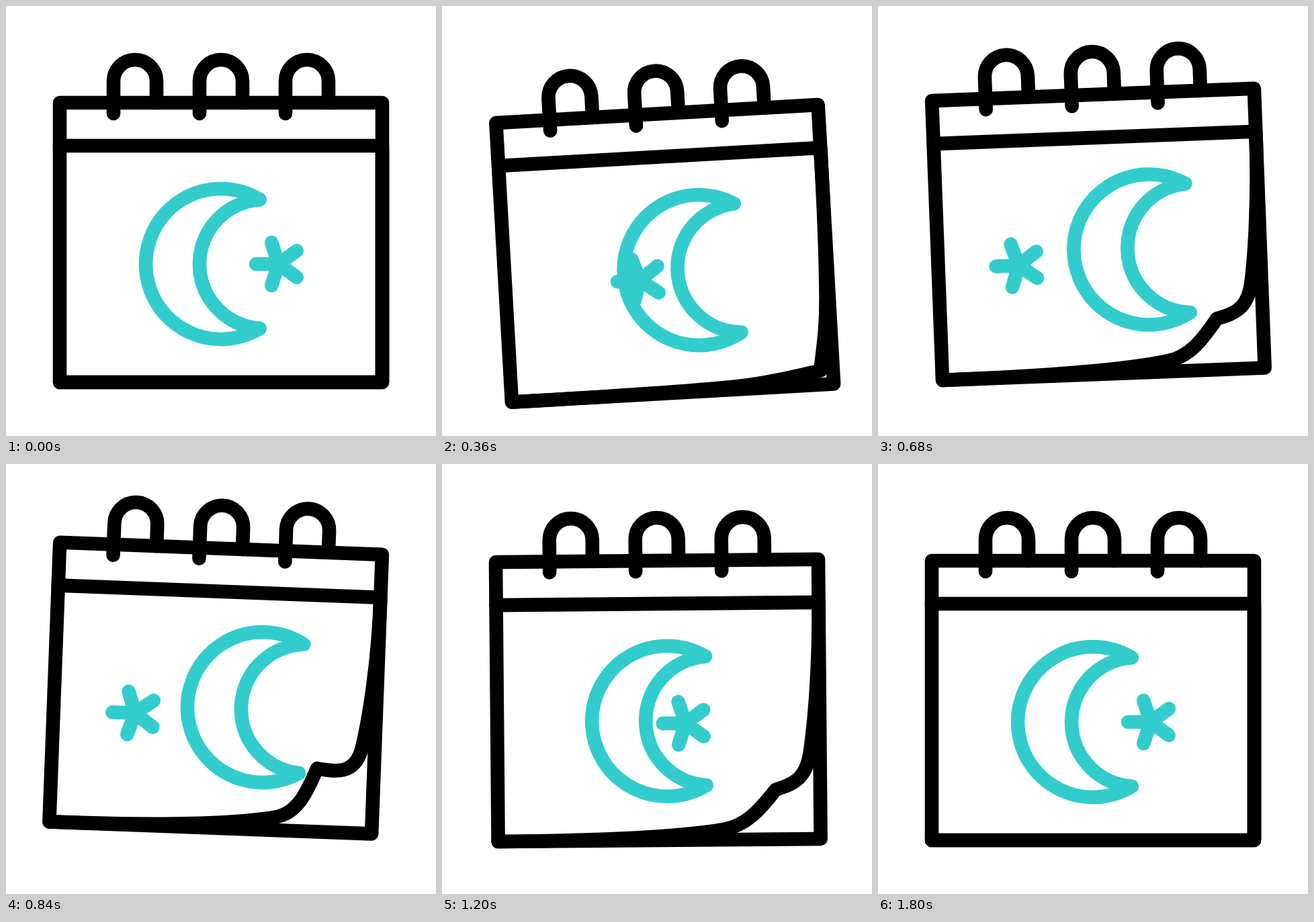
Write an HTML page with a canvas that moves like this. It is 640x640 px and loops after 2 s.

```html
<!DOCTYPE html>
<html lang="en">
<head>
<meta charset="utf-8">
<title>Calendar</title>
<style>
  html, body { margin: 0; width: 100%; height: 100%; overflow: hidden; background: #fff; }
  canvas { display: block; width: 640px; height: 640px; }
</style>
</head>
<body>
<canvas id="stage" width="640" height="640"></canvas>
<script>
const ctx = document.getElementById('stage').getContext('2d');
const LOOP = 2000, STEP = 40;
const INK = '#000', TEAL = '#33cccc';

function bezierEase(x1, y1, x2, y2) {
  const at = (a, b, u) => 3 * a * u * (1 - u) ** 2 + 3 * b * u * u * (1 - u) + u ** 3;
  return p => {
    let lo = 0, hi = 1;
    for (let i = 0; i < 24; i++) {
      const mid = (lo + hi) / 2;
      if (at(x1, x2, mid) < p) lo = mid; else hi = mid;
    }
    return at(y1, y2, (lo + hi) / 2);
  };
}
const smooth = p => p * p * (3 - 2 * p);

// Each key is [time, value, easing into it].
function track(keys) {
  return t => {
    if (t <= keys[0][0]) return keys[0][1];
    for (let i = 1; i < keys.length; i++) {
      const [t0, v0] = keys[i - 1], [t1, v1, ease = smooth] = keys[i];
      if (t < t1) return v0 + (v1 - v0) * ease((t - t0) / (t1 - t0));
    }
    return keys[keys.length - 1][1];
  };
}

const tilt = track([[120, 0], [520, -5], [920, 3], [1360, -2], [1800, 0]]);
const bounce = track([[120, 0], [480, 22.4], [770, -22.2], [1030, 0]]);
const curl = track([[120, 0], [920, 1], [1800, 0]]);
const moonShift = track([[120, 0], [580, 1, bezierEase(.167, .167, .667, 1)], [760, 1], [1360, 0]]);
const starShift = track([[120, 0], [585, 1, bezierEase(.33, .12, .6, 1)], [810, 1], [1370, 0]]);

function stroke(color, build) {
  ctx.strokeStyle = color;
  ctx.beginPath();
  build();
  ctx.stroke();
}

function drawPage(k) {
  // Points slide from the flat edge to the fully curled edge.
  const pt = (x0, y0, x1, y1) => [x0 + (x1 - x0) * k, y0 + (y1 - y0) * k];
  const curve = (a, b, c) => ctx.bezierCurveTo(...a, ...b, ...c);
  stroke(INK, () => {
    ctx.moveTo(80, 208);
    ctx.lineTo(560, 208);
    curve([560, 310], pt(560, 394, 548.5, 394), pt(560, 432, 540, 434));
    curve(pt(560, 475, 531, 474), pt(560, 517, 500, 468), pt(560, 560, 473, 463));
    curve(pt(517, 560, 462, 492), pt(460, 560, 452, 532), pt(416, 560, 416, 540));
    curve(pt(376, 560, 376, 548.5), [290, 560], [80, 560]);
  });
}

function drawRing(x) {
  stroke(INK, () => {
    ctx.moveTo(x - 32, 160);
    ctx.arc(x, 112, 32, Math.PI, 0);
    ctx.lineTo(x + 32, 144);
  });
}

function drawMoon(x, y) {
  const outer = Math.atan2(96, 57.7), inner = Math.atan2(95.8, -6.3);
  stroke(TEAL, () => {
    ctx.arc(x, y, 112, outer, -outer);
    ctx.arc(x + 64, y, 96, -inner, inner, true);
    ctx.closePath();
  });
}

function drawStar(x, y) {
  stroke(TEAL, () => {
    for (let i = 0; i < 5; i++) {
      const a = Math.PI * (1 + i * 0.4);
      ctx.moveTo(x, y);
      ctx.lineTo(x + 33.6 * Math.cos(a), y + 33.6 * Math.sin(a));
    }
  });
}

function draw(t) {
  ctx.fillStyle = '#fff';
  ctx.fillRect(0, 0, 640, 640);
  ctx.save();
  ctx.translate(320, 144 + bounce(t));
  ctx.rotate(tilt(t) * Math.PI / 180);
  ctx.translate(-320, -144);
  ctx.lineWidth = 20.6;
  ctx.lineCap = ctx.lineJoin = 'round';

  stroke(INK, () => ctx.rect(80, 144, 480, 416));
  drawPage(curl(t));
  [192, 320, 448].forEach(drawRing);

  const m = moonShift(t), s = starShift(t);
  drawMoon(320 + 74.5 * m, 384 - 6.5 * m);
  drawStar(405.6 - 206 * s, 384 + 9.8 * s);
  ctx.restore();
}

const start = performance.now();
function tick() {
  const t = (performance.now() - start) % LOOP;
  draw(Math.floor(t / STEP) * STEP);
  requestAnimationFrame(tick);
}
tick();
</script>
</body>
</html>
```
